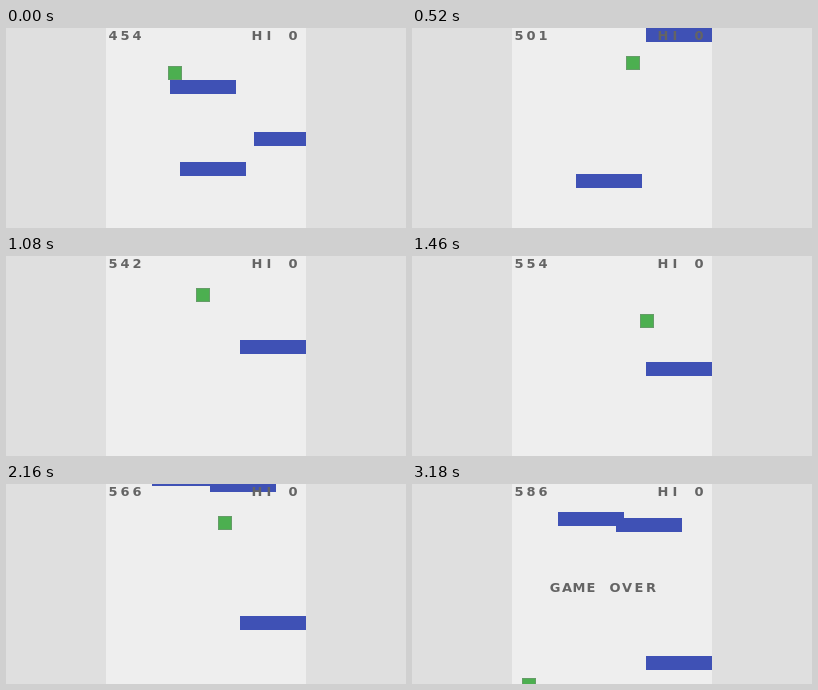
Write an HTML page that moves like this. It is 400 px wide and 200 px high and loops after 3.6 s.

```html
<!DOCTYPE html>
<html lang="en">
<head>
<meta charset="utf-8">
<title>Platform jumper</title>
<style>
  html, body { margin: 0; width: 100%; height: 100%; overflow: hidden; background: #dfdfdf; }
  svg { display: block; width: 400px; height: 200px; }
  text { font: bold 13px "DejaVu Sans", Verdana, sans-serif; fill: #646464; text-anchor: middle; }
</style>
</head>
<body>
<svg viewBox="0 0 400 200">
  <defs><clipPath id="field"><rect x="100" width="200" height="200"/></clipPath></defs>
  <rect width="400" height="200" fill="#dfdfdf"/>
  <rect x="100" width="200" height="200" fill="#eee"/>
  <g id="scene" clip-path="url(#field)" shape-rendering="crispEdges"></g>
  <text id="score" y="11.8"></text>
  <text id="high" y="11.8"></text>
  <text id="over" y="107.8"></text>
</svg>
<script>
const LOOP = 3600, TICK = 20, LAST = 159;
const PX = 2, LEFT = 100;
const GRAVITY = 0.0965;
const $ = id => document.getElementById(id);

// Platform x, and y relative to the scroll position
const platforms = [[37, 114], [74, 99], [32, 73], [67, 0], [52, -69], [23, -72]];

// Scroll: tick, position, speed
const scrollKeys = [
  [0, -46.7, 1], [12, -25.8, 2.1], [26, 0.4, 1.5], [34, 10.1, 0.85],
  [45, 27.1, 1.75], [54, 42.15, 1.4], [64, 51.4, 0.6], [73, 53.3, 0.12],
  [88, 54.65, 0.08], [95, 55.2, 0.1], [101, 58.2, 1], [108, 66.23, 1.27],
  [120, 79.2, 0.75], [134, 83.26, 0.1], [159, 86.05, 0.11]
];

function scrollAt(tick) {
  const i = Math.max(1, scrollKeys.findIndex(k => k[0] >= tick));
  const [t0, p0, v0] = scrollKeys[i - 1], [t1, p1, v1] = scrollKeys[i];
  const d = t1 - t0, u = (tick - t0) / d, w = 1 - u;
  return w * w * ((1 + 2 * u) * p0 + u * d * v0) + u * u * ((1 + 2 * w) * p1 - w * d * v1);
}

const jump = (base, speed, t) => base + speed * t - GRAVITY * t * t / 2;

// Player height above the scroll position
function heightAt(tick) {
  if (tick <= 34) return jump(-66, 3.255, tick);
  if (tick < 85) return jump(jump(-66, 3.255, 34), 2.785, tick - 34);
  if (tick <= 88) return 7;
  return jump(5.75, 3.188, tick - 88);
}

// Each tap turns the player; it rests briefly after landing
function playerX(tick) {
  if (tick <= 34) return 31 + tick;
  if (tick <= 54) return 99 - tick;
  if (tick <= 85) return tick - 9;
  return 76 - Math.max(0, tick - 88);
}

function addRect(w, h, fill) {
  const rect = document.createElementNS("http://www.w3.org/2000/svg", "rect");
  const attrs = { width: w * PX, height: h * PX, fill };
  for (const name in attrs) rect.setAttribute(name, attrs[name]);
  return $("scene").appendChild(rect);
}

function place(rect, x, y) {
  rect.setAttribute("x", LEFT + x * PX);
  rect.setAttribute("y", y * PX);
}

// One centre per character keeps the 12 px grid
function write(id, text, firstCentre) {
  const el = $(id);
  if (el.textContent === text) return;
  el.setAttribute("x", [...text].map((_, i) => firstCentre + 12 * i).join(" "));
  el.textContent = text;
}

const bars = platforms.map(() => addRect(33, 7, "#3f51b5"));
const edge = addRect(7, 7, "#659c68");
const player = addRect(6, 6, "#4caf50");

function draw(time) {
  const tick = Math.min(LAST, Math.floor(time % LOOP / TICK));
  const scroll = scrollAt(tick);
  platforms.forEach(([x, offset], i) => {
    const y = Math.floor(scroll) + offset;
    place(bars[i], x, y);
    bars[i].setAttribute("visibility", y > -7 && y < 99 ? "visible" : "hidden");
  });
  const x = playerX(tick), y = Math.floor(scroll - heightAt(tick));
  place(edge, x, y);
  place(player, x + 0.5, y + 0.5);
  write("score", String(Math.floor(scroll + 500.76)), 107);
  write("over", tick === LAST ? "GAME OVER" : "", 143);
}

write("high", "HI 0", 251);
const start = performance.now();
function animate() {
  draw(performance.now() - start);
  requestAnimationFrame(animate);
}
animate();
</script>
</body>
</html>
```
